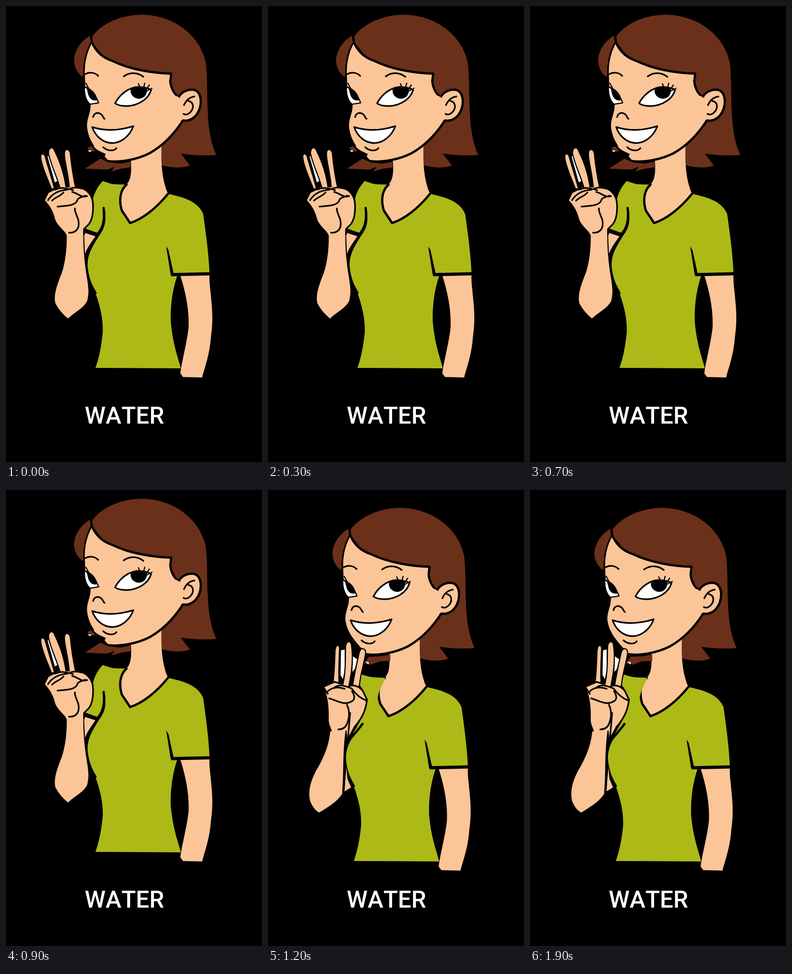
These frames come from a looping animation (561 by 998 pixels, 2 s). An HTML page:

```html
<!DOCTYPE html>
<html lang="en">
<head>
<meta charset="utf-8">
<title>Water sign</title>
<style>
  html, body { margin: 0; width: 100%; height: 100%; overflow: hidden; background: #000; }
  svg { display: block; width: 100vw; height: 100vh; }
  path { fill: none; }
  .hair { fill: #6b301a; }
  .skin { fill: #fcc598; }
  .shirt { fill: #adb917; }
  .white { fill: #fff; }
  .black { fill: #000; }
  .line { stroke: #000; stroke-width: 3.5; stroke-linecap: round; stroke-linejoin: round; }
  .bold { stroke-width: 5; }
  .hem { stroke-width: 7; stroke-linecap: butt; }
  .thin { stroke-width: 2.5; }
  text { font: 500 52px Roboto, Arial, sans-serif; font-kerning: none; fill: #fff; }
</style>
</head>
<body>
<svg viewBox="0 0 561 998" preserveAspectRatio="none">
  <rect width="561" height="998"/>

  <g id="body">
    <!-- hair -->
    <path class="hair" d="M188 78L190 65C215 33 262 18 302 19C370 22 426 65 438 125C442 165 440 200 442 228C443 262 448 300 461 326C435 328 410 327 383 323L403 349C385 356 360 354 341 348L335 250L230 130Z"/>
    <path class="hair" d="M187 63C164 76 150 97 149 119C150 136 157 148 168 155L180 110L188 79Z"/>

    <!-- neck and right arm -->
    <path class="skin" d="M273 330L341 300C339 345 342 382 355 411C330 442 300 466 272 475L254 448C246 428 248 404 264 391C274 380 276 365 273 330Z"/>
    <path class="skin" d="M382 590C395 630 402 670 400 705C396 740 385 778 382 804L388 812L430 813C432 800 446 768 449 725C454 690 452 665 450 645C448 620 445 605 446 588Z"/>

    <!-- shirt -->
    <path class="shirt" d="M264 391C248 405 248 430 254 448L272 475C300 466 330 442 355 411C390 419 420 427 432 455C437 490 444 540 446 584L375 591C366 617 360 652 361 690C365 740 378 772 383 793L196 792C204 770 209 745 212 715C213 690 209 665 196 628C188 612 180 600 177 575C173 548 186 526 203 500C214 482 217 460 214 440L214 388C230 391 248 390 264 391Z"/>
    <path class="line bold" d="M264 391C248 405 248 430 254 448L272 475C300 466 330 442 355 411"/>
    <path class="line bold" d="M214 440C217 470 216 482 203 500C186 526 173 548 177 575C180 600 188 614 196 628"/>
    <path class="black" d="M351 526L356 534L368 588L361 589Z"/>
    <path class="line hem" d="M362 588L449 586"/>

    <!-- face -->
    <path class="skin" d="M187 80C176 100 170 125 171 150L172 178L184 214L183 226C181 240 174 250 176 266C178 284 184 296 191 306L218 337C250 344 290 335 315 322C345 305 370 278 388 250L395 215L379 199C370 195 362 182 360 165L362 150C320 147 270 138 235 121C215 114 199 104 187 80Z"/>
    <path class="line bold" d="M186 64L188 79C199 104 215 114 235 121C270 138 320 147 362 148L360 165C362 182 370 195 379 199"/>
    <path class="line" d="M187 80C176 100 170 125 171 150L172 176M184 214L183 226C181 240 174 250 176 266C178 284 184 296 191 306"/>
    <path class="line bold" d="M220 339C250 344 290 335 315 322C345 305 370 278 388 250"/>

    <!-- ear -->
    <path class="skin line bold" d="M379 199C383 190 395 183 408 183C427 184 430 207 424 226C415 250 396 253 386 250"/>
    <path class="skin" d="M372 196L379 200L390 214L390 247L384 250L372 262Z"/>
    <path class="line" d="M413 198C400 200 393 210 390 217M400 208C411 210 412 222 406 230C400 238 393 239 389 236"/>

    <!-- brows, nose, mouth -->
    <path class="line" d="M174 149C182 144 195 145 202 153M258 154C270 145 287 144 301 155"/>
    <path class="line" d="M191 243C193 234 201 232 207 236C213 239 212 245 216 247"/>
    <path class="white line" d="M189 265C220 275 250 272 279 263C271 285 252 300 232 300C210 299 195 283 189 265Z"/>
    <path class="line" d="M213 309C221 317 236 319 242 311"/>

    <!-- eyes -->
    <path class="white line thin" d="M172 176C185 184 197 194 203 212L184 215C174 206 171 190 172 176Z"/>
    <path class="black" d="M176 177C189 182 199 193 200 206C191 209 183 204 180 193Z"/>
    <path class="line thin" d="M167 172L177 180M175 169L182 182"/>
    <path class="white line" d="M239 213C250 192 270 178 290 177C305 178 314 181 318 184C312 204 290 218 265 219C253 219 244 217 239 213Z"/>
    <path class="black" d="M273 183C282 176 300 175 309 183C309 196 301 203 290 203C279 202 272 193 273 183Z"/>
    <path class="line thin" d="M290 170L295 180M304 169L301 181M314 173L307 184M320 180L309 186"/>
  </g>

  <!-- hand away from the chin -->
  <g id="away">
    <path class="black" d="M146 320L190 308L204 317L219 324L216 329L224 338L205 340L150 334Z"/>
    <path class="hair" d="M178 311L186 307L196 317L186 319ZM173 356L190 345L207 334L224 342L250 345L273 341L273 353L252 356L231 362L238 352L222 358Z"/>
    <path class="white" d="M179 316L187 316L184 320Z"/>
    <path class="shirt" d="M212 383C226 388 235 391 246 391L216 450C217 474 211 490 199 498L172 488L188 460L190 430C190 414 200 396 212 383Z"/>
    <path class="line bold" d="M214 442C217 470 212 487 200 499L172 489"/>
    <path class="skin" d="M171 496L196 504C186 518 179 528 173 542Z"/>

    <path class="skin" d="M133 498C134 530 130 562 122 585C112 610 104 632 108 650C115 664 125 675 136 684C150 670 171 661 178 645C183 625 180 610 175 580C171 550 168 520 170 480Z"/>
    <path class="white" d="M91 329L99 328L114 382L107 386ZM130 345L135 358L134 370Z"/>
    <path class="skin line thin" d="M99 399C90 376 76 345 76 328C78 321 84 323 86 330C92 352 100 376 106 399"/>
    <path class="skin line thin" d="M119 400C109 366 94 337 93 320C95 307 104 308 107 318C119 342 128 368 132 400"/>
    <path class="skin line thin" d="M139 400C136 362 127 337 128 322C129 311 138 312 141 322C143 346 147 372 153 400"/>
    <path class="skin" d="M84 424L92 408L112 397L148 397C170 397 187 410 189 432C193 456 185 477 170 488L157 498L133 502C130 492 117 486 108 468C104 450 96 436 84 424Z"/>
    <path class="line" d="M84 424L92 408L112 398M92 425C100 412 115 403 135 402M101 426C108 418 119 417 126 408M108 402C120 396 130 398 147 403M142 399C156 395 177 400 186 410M145 407C158 410 166 421 178 416"/>
    <path class="line" d="M186 410C193 430 193 462 182 477L171 488L171 500"/>
    <path class="line" d="M113 439C132 437 154 438 157 423C162 418 168 418 174 415M151 443C150 456 162 464 159 482C156 494 146 497 138 496"/>
  </g>

  <!-- hand at the chin -->
  <g id="near">
    <path class="hair" d="M211 380L221 365L245 364L268 360L268 374L245 375L226 382Z"/>
    <path class="shirt" d="M200 402C222 410 240 412 257 411L244 440L225 510L178 548L205 500Z"/>
    <path class="skin" d="M172 607L174 632L182 651L167 660Z"/>
    <path class="line" d="M168 286C171 309 185 329 211 355"/>
    <path class="white" d="M160 351L168 349L168 395L164 414L159 405ZM186 364L196 371L190 392L185 398ZM213 375L221 377L220 382Z"/>

    <path class="skin" d="M137 518C136 558 120 590 105 615C92 640 88 660 92 680C98 695 105 702 112 706C132 694 155 680 164 662C168 620 164 580 173 520Z"/>
    <path class="line bold" d="M174 518C165 568 169 620 165 662M174 553C183 540 193 531 207 512"/>
    <path class="skin line thin" d="M142 426C146 396 146 366 147 350C149 337 157 337 157 348C156 370 154 398 156 426"/>
    <path class="skin line thin" d="M164 426C171 396 169 370 170 342C172 329 182 329 183 340C187 366 184 398 177 430"/>
    <path class="skin line thin" d="M185 430C190 400 195 377 200 355C204 343 214 346 214 357C211 380 202 402 200 432"/>
    <path class="skin" d="M121 431L145 419L166 427L200 428L208 440L217 459C214 485 204 502 190 518L174 546L172 526L137 527L133 505C134 475 131 447 121 431Z"/>
    <path class="line" d="M200 428L208 440L217 459C214 485 204 502 190 518L175 546"/>
    <path class="line" d="M121 431L146 420L160 424M121 431L131 446M129 443C138 432 152 430 168 435M146 432C157 424 170 429 182 434M176 430C188 424 201 431 208 440M183 434C191 446 203 456 216 461"/>
    <path class="line" d="M134 456C150 460 168 474 186 461C192 455 188 447 184 440M173 470C181 487 177 502 173 512C169 522 161 524 154 524M180 488L175 546M133 514L138 527"/>
  </g>

  <text x="172.5" y="914">WATER</text>
</svg>
<script>
  const LOOP = 2000;
  const part = id => document.getElementById(id);
  const body = part("body"), away = part("away"), near = part("near");

  function draw(now) {
    const touching = now % LOOP >= LOOP / 2;
    body.setAttribute("transform", touching ? "translate(-8 20)" : "");
    away.style.display = touching ? "none" : "";
    near.style.display = touching ? "" : "none";
    requestAnimationFrame(() => draw(performance.now() - start));
  }

  const start = performance.now();
  draw(0);
</script>
</body>
</html>
```
